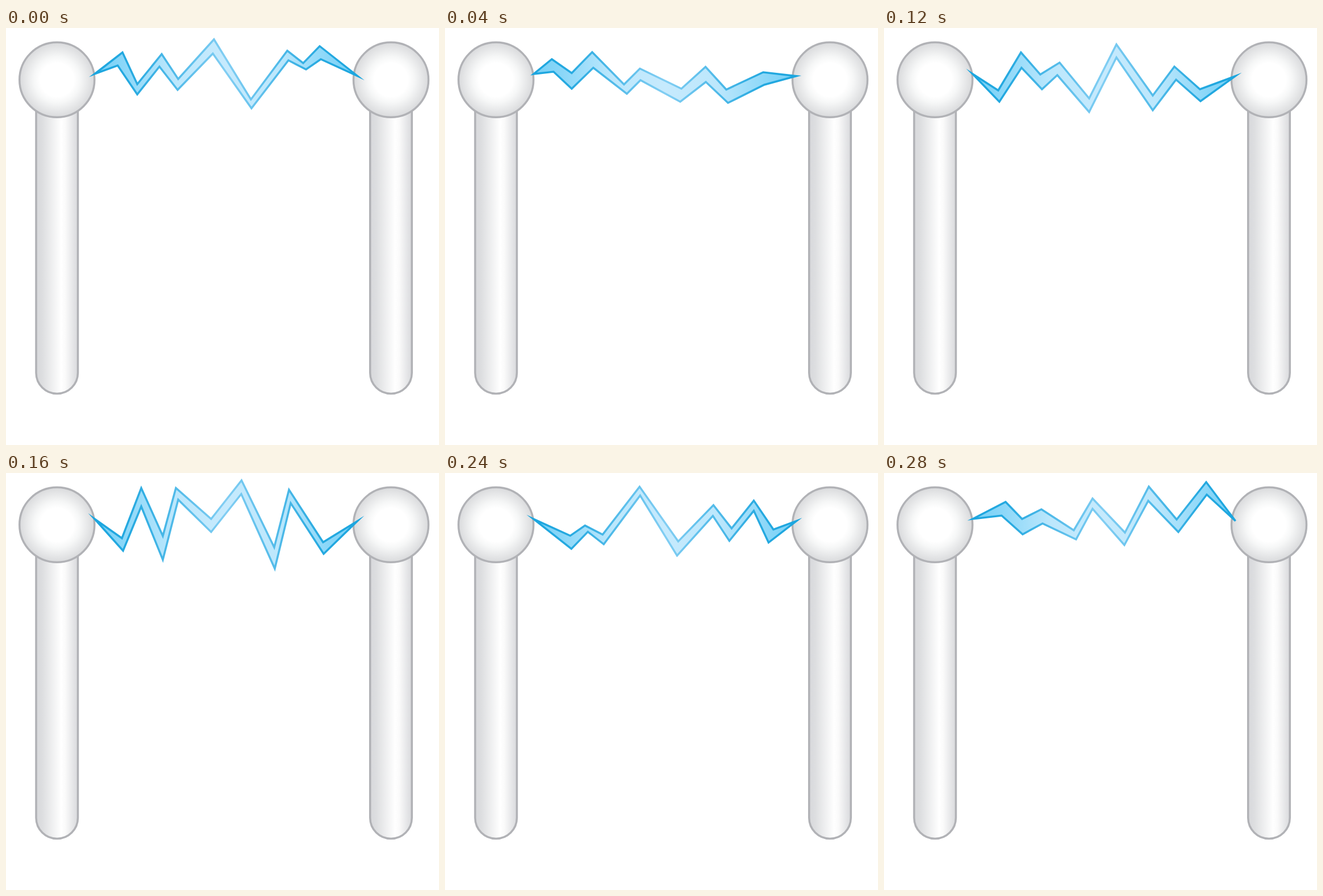
Write an HTML page that moves like this. It is 762 by 735 pixels and loops after 0.32 s.

```html
<!DOCTYPE html>
<html lang="en">
<head>
<meta charset="utf-8">
<title>Electric arc</title>
<style>
  html, body { margin: 0; width: 100%; height: 100%; overflow: hidden; background: #fff; }
  svg { display: block; width: 100%; height: 100%; }
</style>
</head>
<body>
<svg viewBox="0 0 762 735">
  <defs>
    <radialGradient id="ball">
      <stop offset=".45" stop-color="#fff"/>
      <stop offset=".62" stop-color="#f6f7f7"/>
      <stop offset="1" stop-color="#d9dadc"/>
    </radialGradient>
    <linearGradient id="rod">
      <stop offset="0" stop-color="#d7d8db"/>
      <stop offset=".15" stop-color="#dddee0"/>
      <stop offset=".6" stop-color="#fff"/>
      <stop offset=".7" stop-color="#fafafa"/>
      <stop offset="1" stop-color="#d8d9dc"/>
    </linearGradient>
    <linearGradient id="glow" gradientUnits="userSpaceOnUse" x1="156" x2="618">
      <stop offset="0" stop-color="#74d0f6"/>
      <stop offset=".1" stop-color="#88d6f8"/>
      <stop offset=".3" stop-color="#bce7fc"/>
      <stop offset=".5" stop-color="#c6eafd"/>
      <stop offset=".7" stop-color="#bce7fc"/>
      <stop offset=".9" stop-color="#88d6f8"/>
      <stop offset="1" stop-color="#74d0f6"/>
    </linearGradient>
    <linearGradient id="edge" gradientUnits="userSpaceOnUse" x1="156" x2="618">
      <stop offset="0" stop-color="#1ca6df"/>
      <stop offset=".13" stop-color="#25a9e0"/>
      <stop offset=".5" stop-color="#82cef3"/>
      <stop offset=".87" stop-color="#25a9e0"/>
      <stop offset="1" stop-color="#1ca6df"/>
    </linearGradient>
    <g id="post" stroke="#b1b2b6" stroke-width="3.5">
      <path fill="url(#rod)" d="M53 100V607.8a36.75 36.75 0 0 0 73.5 0V100Z"/>
      <circle fill="url(#ball)" cx="89.75" cy="91.3" r="66"/>
    </g>
  </defs>

  <use href="#post"/>
  <use href="#post" x="587.75"/>

  <!-- Every bolt runs along its upper edge to the right tip, then back along the lower edge. -->
  <g id="bolts" fill="url(#glow)" stroke="url(#edge)" stroke-width="3.5" stroke-miterlimit="10">
    <path id="a" d="M156 81L205 43 231 99 274 46 303 90 366 20 431 126 495 40 523 62 552 32 618.5 84.5
      554 55 528 73 497 57 432 141.5 364 45 302 109 270 68 231 117 196.5 66Z"/>
    <path d="M156 81L188 55 223 79.5 259 42.5 315 99.5 343 71.5 416 107 458.5 68.5 495 108.5 560 78 618 84.7
      562 100 498 132 459 95 414 130 344 92 320 116 261 70 223 107 191 77Z"/>
    <use href="#e" transform="rotate(180 387.2 82.8)"/>
    <path d="M156 81L201 110 241 43 275 82 309 61 361 124 409 29 473 119 511 68 556 108 618 85
      557 129 514 91 473 145 409 52 361 148 305 83 278 108 242 70 203 130Z"/>
    <path d="M156 81L204 115 238 26.5 276 111 299 26.5 361 81 414.5 13 472 131 498 29.5 558 122 618 85
      559 142.5 501 53 473 168.5 414 37 361 104 303 47 276 153 238 59 206 137Z"/>
    <path d="M156 81L190 100 229.5 39 281 108 322 66 361 90 409 70 461 120 508 80 559 92 618 85
      560 113 511 104 461 146 408 93 361 108 327 81 282 133 229.5 66 192.5 122Z"/>
    <use href="#a" transform="rotate(180 387.2 82.8)"/>
    <path id="e" d="M156 81L214 51 243 81 277 64 334 101 367 45 424 105 466 24 515 82 567 16 618.5 84.5
      568 38 518 104 465 49 423 127 367 63 338 117 279 89 244 108 207 75Z"/>
  </g>
</svg>
<script>
  const STEP = 40;
  const bolts = [...document.getElementById('bolts').children];
  const start = performance.now();

  // Opacity keeps a hidden bolt usable by its rotated twin only if it is set per step,
  // so the twins are turned into plain copies of the path first.
  bolts.forEach((bolt, i) => {
    if (bolt.tagName !== 'use') return;
    const copy = document.querySelector(bolt.getAttribute('href')).cloneNode();
    copy.removeAttribute('id');
    copy.setAttribute('transform', bolt.getAttribute('transform'));
    bolt.replaceWith(copy);
    bolts[i] = copy;
  });

  function draw(now) {
    const active = Math.floor(Math.max(0, now - start) / STEP) % bolts.length;
    bolts.forEach((bolt, i) => bolt.setAttribute('visibility', i === active ? 'visible' : 'hidden'));
  }

  function tick() {
    draw(performance.now());
    requestAnimationFrame(tick);
  }
  tick();
</script>
</body>
</html>
```
